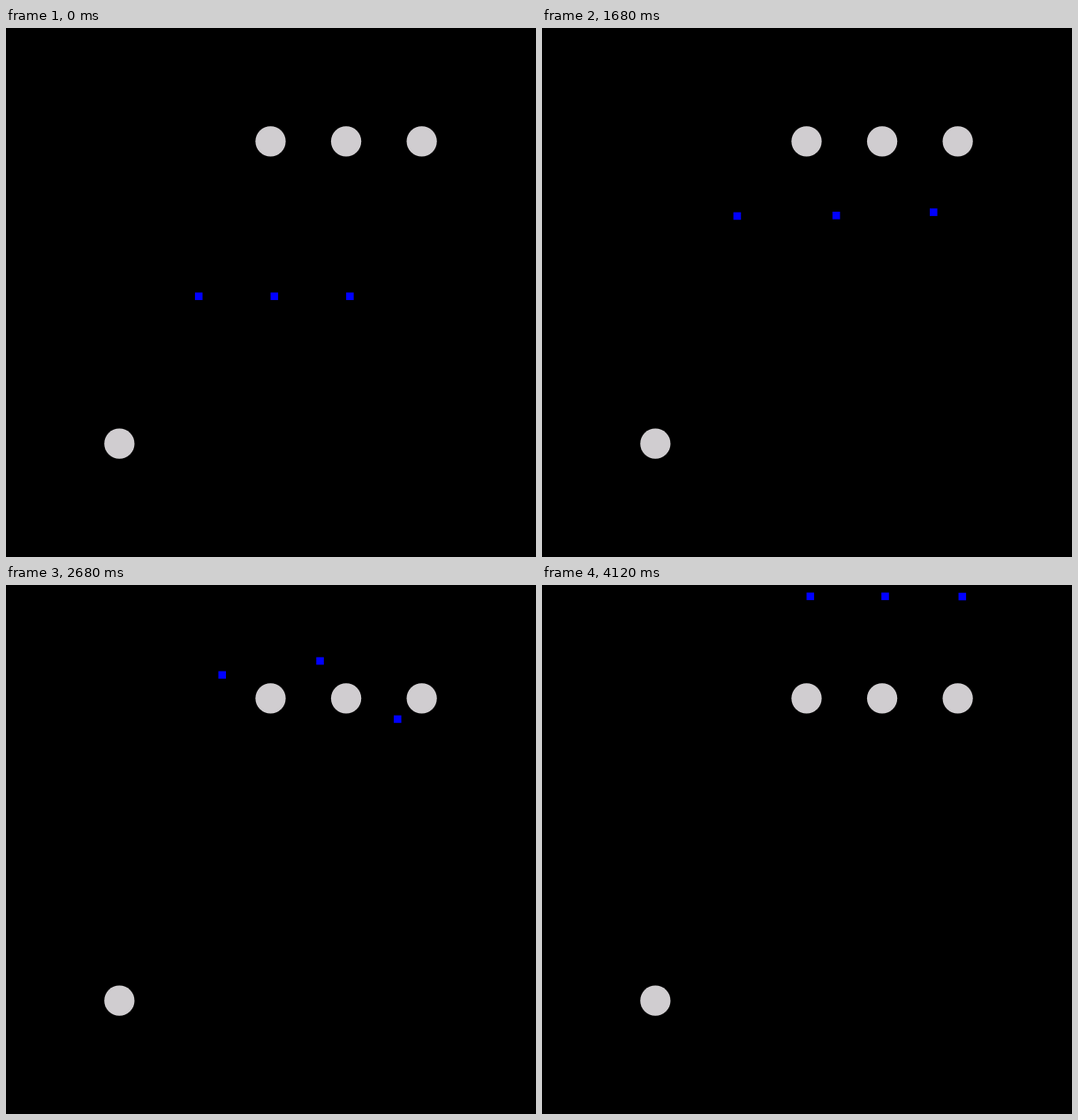
An HTML page with a canvas for the animation above (5.48 s loop, 600 by 599 pixels).

```html
<!DOCTYPE html>
<html lang="en">
<head>
<meta charset="utf-8">
<title>Three agents passing obstacles</title>
<style>
  html, body { margin: 0; width: 100%; height: 100%; overflow: hidden; background: #000; }
  canvas { display: block; }
</style>
</head>
<body>
<canvas id="stage" width="600" height="599"></canvas>
<script>
const ctx = document.getElementById('stage').getContext('2d');

const LOOP = 5480, START = 920, STEP = 40, LAST = 81;
const CELL = 599 / 140;   // the world is 140 cells wide
const SPEED = 1.06;       // cells per step on the way to the goal

const obstacles = [[70, 30], [90, 30], [110, 30], [30, 110]];

// Steps at which every agent passes its dodge points
const keys = [0, 10, 30, 45, 55];

const agents = [
  { dodge: [[51, 71], [50.25, 60.6], [53.6, 39], [57.2, 23.8], [61.5, 14.6]],
    goal: [[71, 3]] },
  { dodge: [[71, 71], [74.2, 60.5], [81.1, 38.4], [83.1, 20.1], [88.6, 6.5]],
    goal: [[90.8, 3]] },
  { dodge: [[91, 71], [98.3, 60.3], [107, 39], [103.6, 35.5], [101.7, 28]],
    goal: [[112, 8.5], [111.2, 3]] }
];

// Smooth curve through the dodge points
function curve(points, k) {
  const end = keys.length - 1;
  let i = 0;
  while (keys[i + 1] <= k) i++;
  const span = keys[i + 1] - keys[i];
  const u = (k - keys[i]) / span, v = 1 - u;
  return [0, 1].map(axis => {
    const slope = j => {
      const a = Math.max(j - 1, 0), b = Math.min(j + 1, end);
      return (points[b][axis] - points[a][axis]) / (keys[b] - keys[a]);
    };
    return v * v * ((1 + 2 * u) * points[i][axis] + u * span * slope(i))
         + u * u * ((1 + 2 * v) * points[i + 1][axis] - v * span * slope(i + 1));
  });
}

// Straight legs at constant speed, stopping at the last point
function walk(from, legs, dist) {
  for (const to of legs) {
    const dx = to[0] - from[0], dy = to[1] - from[1];
    const len = Math.hypot(dx, dy);
    if (dist < len) return [from[0] + dx * dist / len, from[1] + dy * dist / len];
    dist -= len;
    from = to;
  }
  return from;
}

function position({ dodge, goal }, k) {
  const free = keys.at(-1);
  return k < free ? curve(dodge, k) : walk(dodge.at(-1), goal, (k - free) * SPEED);
}

function draw(ms) {
  const t = ms % LOOP;
  const k = t < START ? 0 : Math.min(LAST, Math.floor((t - START) / STEP) + 1);

  ctx.setTransform(1, 0, 0, 1, 0, 0);
  ctx.fillStyle = '#000';
  ctx.fillRect(0, 0, 600, 599);
  ctx.scale(CELL, CELL);

  ctx.fillStyle = '#d0cdd0';
  for (const [x, y] of obstacles) {
    ctx.beginPath();
    ctx.arc(x, y, 4, 0, Math.PI * 2);
    ctx.fill();
  }

  ctx.fillStyle = '#00f';
  for (const agent of agents) {
    const [x, y] = position(agent, k);
    ctx.fillRect(x - 1, y - 1, 2, 2);
  }
}

const begin = performance.now();
function tick() {
  draw(performance.now() - begin);
  requestAnimationFrame(tick);
}
tick();
</script>
</body>
</html>
```
